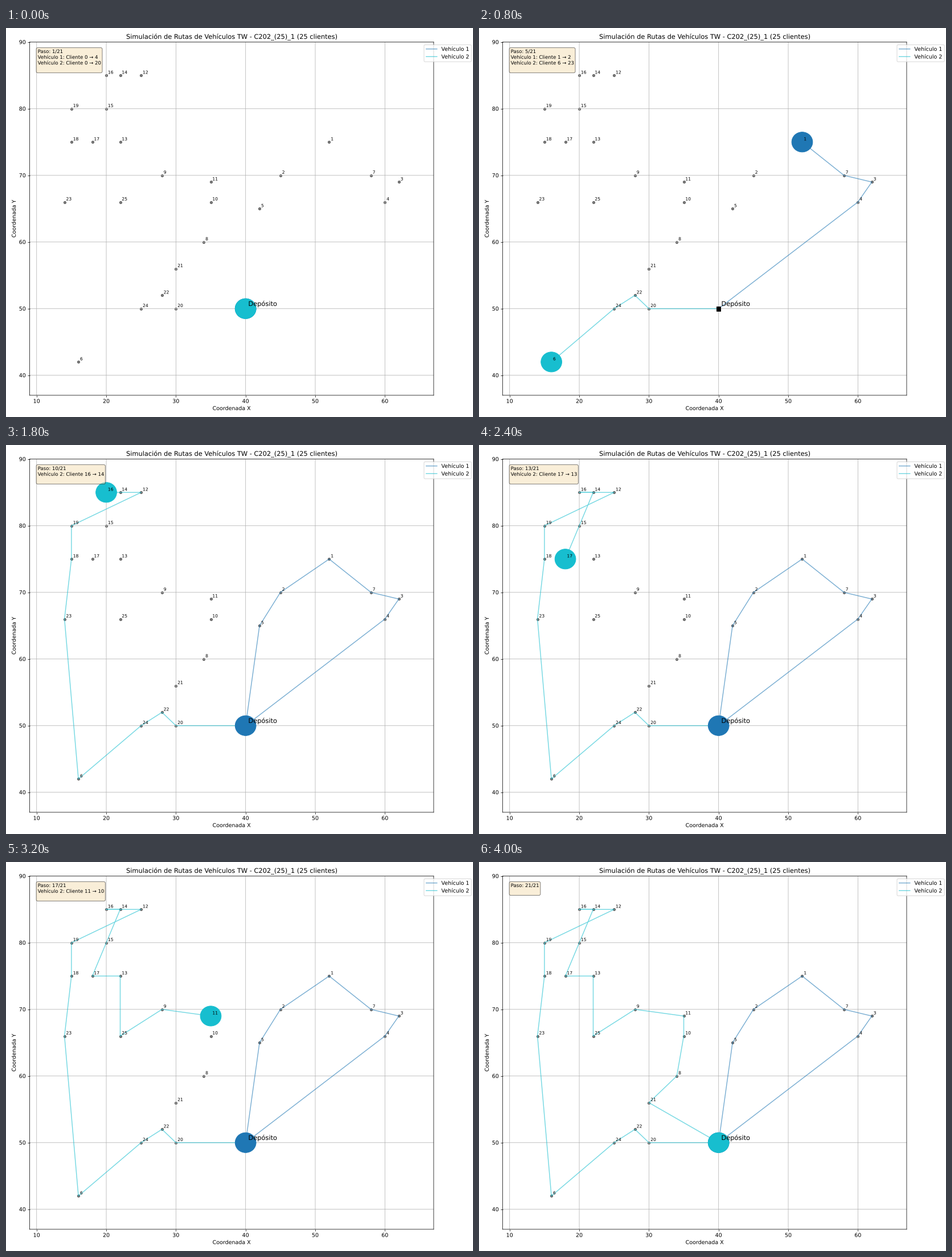
A matplotlib script for the animation above (4200 ms loop, 820 by 683 pixels).

```python
from math import atan2

import matplotlib.pyplot as plt
from matplotlib.animation import FuncAnimation
from matplotlib.patches import Circle
from matplotlib.patheffects import Normal

WIDTH, HEIGHT = 820, 683
DPI = WIDTH / 12
STEP_MS = 200
COLORS = ["#1f77b4", "#17becf"]

# Index 0 is the depot, the rest are the clients
PLACES = [
    (40, 50), (52, 75), (45, 70), (62, 69), (60, 66), (42, 65), (16, 42),
    (58, 70), (34, 60), (28, 70), (35, 66), (35, 69), (25, 85), (22, 75),
    (22, 85), (20, 80), (20, 85), (18, 75), (15, 75), (15, 80), (30, 50),
    (30, 56), (28, 52), (14, 66), (25, 50), (22, 66),
]
DEPOT = PLACES[0]


def bearing_from(x0, y0):
    return lambda place: atan2(place[0] - x0, place[1] - y0)


def north_to_south(place):
    return -place[1], place[0]


def plan_routes():
    """One sweep east of the depot; out, down a strip and back to the west."""
    east = [p for p in PLACES if p[0] > DEPOT[0]]
    west = [p for p in PLACES if p[0] < DEPOT[0]]
    strip = [p for p in west if 18 <= p[0] <= 22]
    back = [p for p in west if p[0] > 25 and p[1] > 55]
    out = [p for p in west if p not in strip + back]

    east.sort(key=bearing_from(*DEPOT), reverse=True)
    out.sort(key=bearing_from(31, 60))
    strip.sort(key=north_to_south)
    back.sort(key=north_to_south)
    return [[DEPOT, *stops, DEPOT] for stops in (east, out + strip + back)]


ROUTES = plan_routes()
STEPS = max(map(len, ROUTES))

# Smooth sub-pixel placement of lines and glyphs
plt.rcParams.update({
    "font.family": "DejaVu Sans",
    "text.hinting": "none",
    "path.snap": False,
    "path.effects": [Normal()],
})
# The tiny extra height guards against rounding down to 682 pixels
fig, ax = plt.subplots(figsize=(12, (HEIGHT + 0.001) / DPI), dpi=DPI)
ax.set(xlim=(9, 67), ylim=(37, 90),
       xlabel="Coordenada X", ylabel="Coordenada Y")
ax.set_title("Simulación de Rutas de Vehículos TW - C202_(25)_1 (25 clientes)")
ax.grid(True)


def label(text, place, offset, size):
    ax.annotate(text, place, xytext=(offset, offset),
                textcoords="offset points", fontsize=size)


ax.scatter(*zip(*PLACES[1:]), s=20, c="black", alpha=0.5)
ax.plot(*DEPOT, "ks", markersize=8, zorder=2.5)
label("Depósito", DEPOT, 5, 12)
for number, place in enumerate(PLACES[1:], 1):
    label(str(number), place, 3, 8)

trails, vehicles = [], []
for number, color in enumerate(COLORS, 1):
    trails += ax.plot([], [], color=color, alpha=0.6,
                      label=f"Vehículo {number}")
    vehicles.append(ax.add_patch(Circle(DEPOT, 1.5, color=color, zorder=2.9)))
ax.legend(handles=trails, loc="upper right", bbox_to_anchor=(1.1, 1))

status = ax.text(0.02, 0.98, "", transform=ax.transAxes, fontsize=9, va="top",
                 bbox=dict(boxstyle="round", facecolor="wheat", alpha=0.5))
fig.tight_layout()


def update(step):
    text = f"Paso: {step + 1}/{STEPS}\n"
    for number, (route, trail, vehicle) in enumerate(
            zip(ROUTES, trails, vehicles), 1):
        visited = route[:step + 1]
        trail.set_data(*zip(*visited))
        vehicle.center = visited[-1]
        if step + 1 < len(route):
            here, target = map(PLACES.index, route[step:step + 2])
            text += f"Vehículo {number}: Cliente {here} → {target}\n"
    status.set_text(text)
    return [*trails, *vehicles, status]


anim = FuncAnimation(fig, update, frames=STEPS, interval=STEP_MS,
                     repeat=True, repeat_delay=0, blit=False)
plt.show()
```
